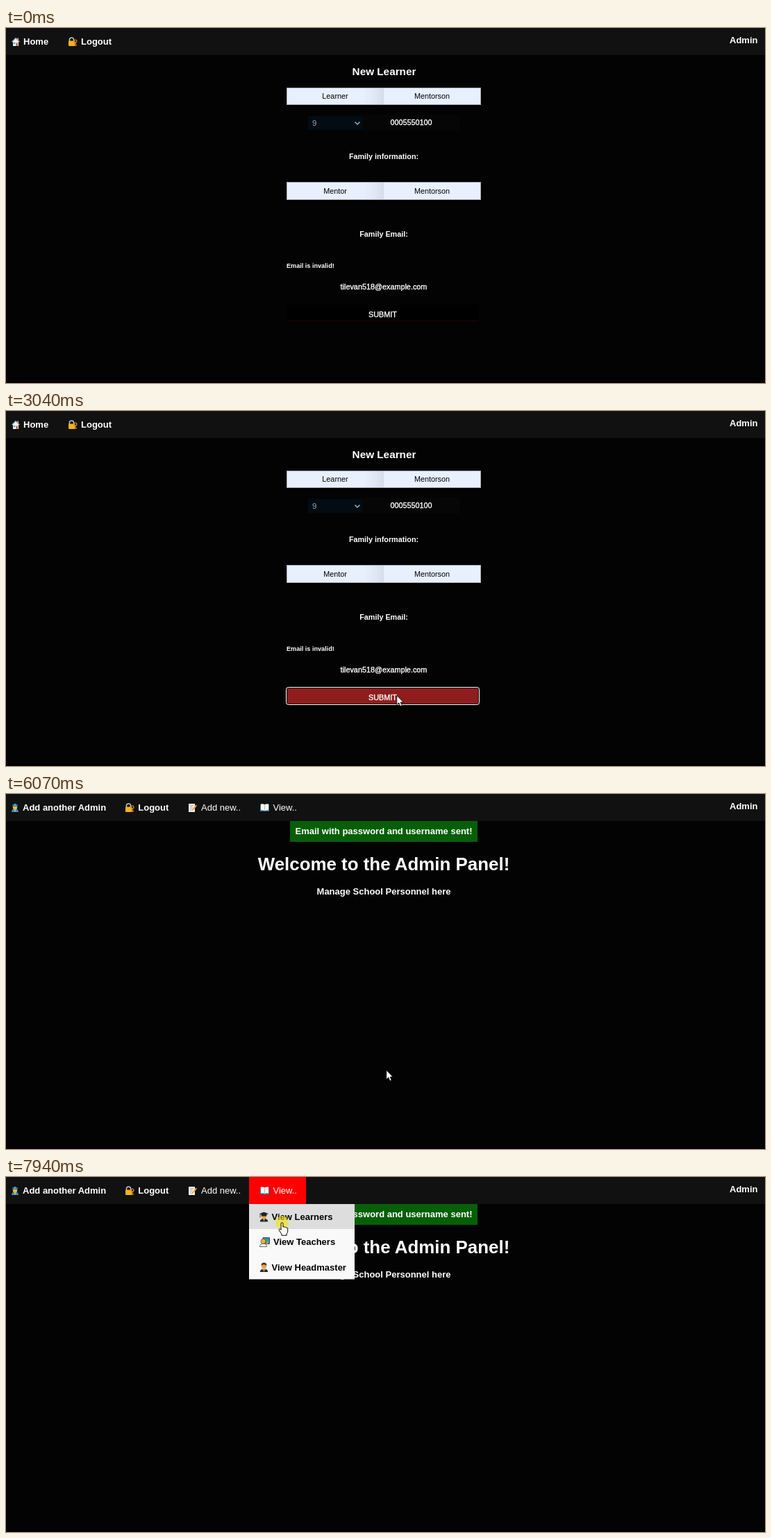
An HTML page that plays this animation: 1093x512 px, repeating every 8 s.

```html
<!DOCTYPE html>
<html lang="en">
<head>
<meta charset="utf-8">
<title>School admin panel</title>
<style>
  html, body { margin: 0; width: 100%; height: 100%; overflow: hidden; background: #030303; }
  svg { display: block; }
  #stage { width: 100vw; height: 100vh; }
  text { font: 13px "Liberation Sans", Arial, sans-serif; fill: #fff; white-space: pre; }
  .b { font-weight: bold; }
  .mid { text-anchor: middle; }
  .field { font-size: 10.83px; }
  .light { stroke: #fff; stroke-width: .35px; }
  .dark { fill: #000; }
  .h5 { font-size: 10.8px; font-weight: bold; }
  .input { stroke: #a4a8b2; }
</style>
</head>
<body>
<svg id="stage" viewBox="0 0 1093 512" preserveAspectRatio="none">
  <defs>
    <linearGradient id="shade">
      <stop offset=".39" stop-color="#e8f0fe"/>
      <stop offset=".45" stop-color="#e1e8f6"/>
      <stop offset=".5" stop-color="#d6dce9"/>
      <stop offset=".5" stop-color="#e8f0fe"/>
    </linearGradient>
    <g id="house">
      <path d="M2 6L6 2L10 6V13H2Z" fill="#eef2f3"/>
      <path d="M8.4 1.4H10V4.5H8.4Z" fill="#c9d0d2"/>
      <path d="M.6 7L6 1.6L11.4 7" fill="none" stroke="#a9b8bd" stroke-width="1.3"/>
      <path d="M6.6 8.5H8.8V13H6.6Z" fill="#a85840"/>
      <path d="M3 8H5.2V10.2H3Z" fill="#3b9bd0"/>
    </g>
    <g id="lock">
      <path d="M2.4 6V4A3.1 3.1 0 0 1 8.6 4V6" fill="none" stroke="#c4c8cb" stroke-width="1.5"/>
      <rect x="1" y="5.6" width="9.4" height="7.4" rx="1" fill="#f5b21d"/>
      <circle cx="11" cy="6" r="1.9" fill="none" stroke="#d98a12" stroke-width="1.3"/>
      <path d="M11 8V13M11 11.6H13" stroke="#d98a12" stroke-width="1.3"/>
    </g>
    <g id="officer">
      <path d="M1 13Q1 8.6 6 8.6T11 13Z" fill="#3c8fc6"/>
      <circle cx="6" cy="6.2" r="3.2" fill="#f0b73c"/>
      <path d="M1.6 3L6 .4L10.4 3L9 5H3Z" fill="#2f7fb5"/>
      <path d="M5.2 2.2H6.8V3.6H5.2ZM5.4 9H6.6V12.6H5.4Z" fill="#f3d469"/>
    </g>
    <g id="memo">
      <path d="M1 1H10V13H1Z" fill="#f1f1ee"/>
      <path d="M2.5 3.5H8M2.5 5.7H7M2.5 8H5.5M2.5 10.4H5" stroke="#999" stroke-width=".8"/>
      <path d="M6 10.6L11.8 3.8" stroke="#efaa2a" stroke-width="2"/>
      <path d="M11.2 4.5L12.4 3.1" stroke="#df6d63" stroke-width="2"/>
    </g>
    <g id="book">
      <path d="M0 2H13V12H0Z" fill="#35759a"/>
      <path d="M1 1.5Q4 .8 6.5 2.2Q9 .8 12 1.5V10.5Q9 10 6.5 11.3Q4 10 1 10.5Z" fill="#f5f5f1"/>
      <path d="M6.5 2.2V11.3" stroke="#aaa" stroke-width=".8"/>
    </g>
    <g id="graduate">
      <path d="M.8 14Q.8 9.4 6.5 9.4T12.2 14Z" fill="#2a2a2a"/>
      <circle cx="6.5" cy="6.8" r="3.4" fill="#e9a63a"/>
      <path d="M0 2.4L6.5 0L13 2.4L6.5 5Z" fill="#222"/>
      <path d="M3 3.5H10V5.6H3ZM1 2.8V8" fill="#222" stroke="#222" stroke-width=".8"/>
      <path d="M5.5 10H7.5L6.5 13Z" fill="#eee"/>
    </g>
    <g id="teacher">
      <path d="M5 1H14.4V10H5Z" fill="#2b9ba0" stroke="#444" stroke-width="1"/>
      <path d="M.4 14Q.4 9.6 5.5 9.6T10.6 14Z" fill="#f6f6f4" stroke="#444" stroke-width=".8"/>
      <circle cx="5.5" cy="6.2" r="3.5" fill="#f0b33f" stroke="#444" stroke-width=".7"/>
      <path d="M9.5 12L12.8 6" stroke="#e3953b" stroke-width="1.6"/>
    </g>
    <g id="suit">
      <path d="M.8 14Q.8 9.4 6.5 9.4T12.2 14Z" fill="#2b2b2b"/>
      <circle cx="6.5" cy="5.4" r="3.6" fill="#e8a83c"/>
      <path d="M2.7 5Q2.4 .6 6.5 .6T10.3 5Q8 2.8 5 3.4Z" fill="#4a3526"/>
      <path d="M4.6 9.5H8.4L6.5 14Z" fill="#f2f2f2"/>
      <path d="M6.5 10V13.5" stroke="#b33" stroke-width="1"/>
    </g>
  </defs>

  <rect width="1093" height="512" fill="#030303"/>
  <rect y="510" width="1093" height="2" fill="#000"/>
  <rect width="1093" height="39" fill="#111"/>
  <text class="b" x="1042" y="21.6">Admin</text>

  <g id="form">
    <use href="#house" x="8" y="13"/>
    <text class="b" x="25" y="24">Home</text>
    <use href="#lock" x="89" y="13"/>
    <text class="b" x="108" y="24">Logout</text>

    <text class="b mid" x="544.5" y="67.6" style="font-size:15.3px">New Learner</text>
    <rect class="input" x="404.5" y="86.5" width="279" height="24" fill="url(#shade)"/>
    <text class="field mid dark" x="474" y="102.4">Learner</text>
    <text class="field mid dark" x="613.5" y="102.4">Mentorson</text>
    <rect x="435" y="127" width="79" height="20" fill="#020c12"/>
    <text x="441" y="141.3" style="font-size:11.5px;fill:#8ea9b8">9</text>
    <path d="M502.5 135.5L506 139L509.5 135.5" fill="none" stroke="#9fb0b8" stroke-width="1.5"/>
    <rect x="514" y="125" width="140" height="23" fill="#060606"/>
    <text class="field light mid" x="583.5" y="140.4">0005550100</text>

    <text class="h5 mid" x="544" y="189.4">Family information:</text>
    <rect class="input" x="404.5" y="222.5" width="279" height="25" fill="url(#shade)"/>
    <text class="field mid dark" x="474" y="238.9">Mentor</text>
    <text class="field mid dark" x="613.5" y="238.9">Mentorson</text>

    <text class="h5 mid" x="544" y="300.9">Family Email:</text>
    <text class="b" x="404" y="345.8" style="font-size:9.1px">Email is invalid!</text>
    <text class="field light mid" x="544" y="377.4">tilevan518@example.com</text>

    <rect x="404" y="399" width="277" height="24" rx="2" fill="#000"/>
    <path d="M405 422.5H680" stroke="#260505"/>
    <rect id="hover" x="404" y="399" width="277" height="24" rx="2" fill="#8f1d1d"/>
    <g id="focus" fill="none">
      <rect x="404.5" y="399.5" width="276" height="23" rx="2" stroke="#101010"/>
      <rect x="403.5" y="398.5" width="278" height="25" rx="3" stroke="#fff"/>
    </g>
    <text class="field light mid" x="542.5" y="416.8">SUBMIT</text>
  </g>

  <g id="panel">
    <g id="flash">
      <rect id="flashBox" y="39" fill="#065f06"/>
      <text id="flashText" class="mid" x="544">Email with password and username sent!</text>
    </g>
    <g id="welcome">
      <text class="b mid" x="544" y="110" style="font-size:25.9px">Welcome to the Admin Panel!</text>
      <text class="b mid" x="544" y="145">Manage School Personnel here</text>
    </g>
    <rect id="tab" x="350" width="82" height="39" fill="#f00"/>
    <use href="#officer" x="7" y="13"/>
    <text class="b" x="24" y="24">Add another Admin</text>
    <use href="#lock" x="171" y="13"/>
    <text class="b" x="190.3" y="24">Logout</text>
    <use href="#memo" x="262" y="13"/>
    <text x="281" y="24">Add new..</text>
    <use href="#book" x="366" y="13"/>
    <text x="384.5" y="24">View..</text>
    <g id="menu">
      <rect x="350" y="39" width="152" height="108.5" fill="#f9f9f9"/>
      <rect id="item" x="350" y="39" width="152" height="36" fill="#ddd"/>
      <use href="#graduate" x="365" y="50.5"/>
      <text class="b dark" x="382.5" y="62">View Learners</text>
      <use href="#teacher" x="365" y="86.5"/>
      <text class="b dark" x="385" y="98.3">View Teachers</text>
      <use href="#suit" x="365" y="123"/>
      <text class="b dark" x="382.5" y="134.7">View Headmaster</text>
    </g>
  </g>

  <circle id="click" r="9.7" fill="#f7e600"/>
  <g id="pointer" stroke="#000" stroke-width=".8" fill="#fff" stroke-linejoin="round">
    <path id="arrow" d="M.3 .3V13.6L3.3 10.8L5.4 15.8L7.7 14.8L5.6 10H9.7Z"/>
    <path id="hand" stroke-width="1" d="M-1.4 10.5V1.3Q-1.4 0 0 0T1.4 1.3V6.4Q2.7 5.4 3.8 6.8Q5.1 6 6 7.4Q8 6.8 8.2 9V12.5Q8 15 6.6 16.2V18.5H-.6V16.6L-4.3 11Q-4.8 9.4-3.6 9.2Q-2.6 9-1.4 10.5Z"/>
  </g>
</svg>
<script>
  const LOOP = 8000;
  const $ = id => document.getElementById(id);
  const show = (id, on) => $(id).setAttribute('visibility', on ? 'inherit' : 'hidden');
  const out = u => u * (2 - u);
  const smooth = u => u * u * (3 - 2 * u);
  const linear = u => u;

  // Each move: first and last step times, step count, start and end point, easing.
  const moves = [
    { t0: 100, t1: 460, n: 6, from: [576, 540], to: [559, 415], ease: out },
    { t0: 560, t1: 560, n: 1, from: [559, 415], to: [556, 407], ease: linear },
    { t0: 710, t1: 710, n: 1, from: [556, 407], to: [556, 406], ease: linear },
    { t0: 2650, t1: 2650, n: 1, from: [556, 406], to: [557, 410], ease: linear },
    { t0: 2880, t1: 3040, n: 3, from: [557, 410], to: [562.5, 410], ease: linear },
    { t0: 6070, t1: 6070, n: 1, from: [562.5, 410], to: [547.5, 398], ease: linear },
    { t0: 6140, t1: 6850, n: 10, from: [547.5, 398], to: [392.5, 26.5], ease: smooth },
    { t0: 6940, t1: 7020, n: 2, from: [392.5, 26.5], to: [395, 21], ease: linear },
    { t0: 7170, t1: 7490, n: 5, from: [395, 21], to: [397, 64], ease: smooth },
    { t0: 7710, t1: 7710, n: 1, from: [397, 64], to: [397.5, 65.7], ease: linear }
  ];

  function pointerAt(t) {
    const m = moves.filter(m => m.t0 <= t).pop();
    if (!m) return [576, 540];
    const gap = (m.t1 - m.t0) / (m.n - 1) || 1;
    const step = Math.min(m.n, 1 + Math.floor((t - m.t0) / gap + 1e-6));
    const u = m.ease(step / m.n);
    return m.from.map((a, i) => a + (m.to[i] - a) * u);
  }

  function drawFlash(t) {
    const step = t < 5210 ? 0 : t < 5290 ? 0.5 : 1;
    const bold = step > 0;
    const pad = 2 + 5.5 * step;
    const width = (bold ? 255 : 236) + 2 * pad;
    const box = $('flashBox');
    box.setAttribute('x', 544 - width / 2);
    box.setAttribute('width', width);
    box.setAttribute('height', 15 + 2 * pad);
    $('flashText').setAttribute('y', 50.4 + pad);
    $('flashText').style.fontWeight = bold ? 'bold' : 'normal';
    $('flash').setAttribute('opacity', 0.3 + 0.7 * step);
    $('welcome').setAttribute('transform', `translate(0 ${11 * (step - 1)})`);
  }

  function draw(t) {
    const [x, y] = pointerAt(t);
    const onPanel = t >= 5140;
    const open = onPanel && x < 432 && y < 75;
    const onItem = open && y > 39;

    show('form', !onPanel);
    show('panel', onPanel);
    $('hover').setAttribute('opacity', t < 388 ? 0 : t < 460 ? 0.5 : 1);
    show('focus', !onPanel && t >= 1097);
    drawFlash(t);
    show('tab', open);
    show('menu', open);
    show('item', onItem);

    show('arrow', !onItem);
    show('hand', onItem);
    $('pointer').setAttribute('transform', `translate(${x} ${y})`);

    const clicking = (t >= 1020 && t < 1250) || t >= 7940;
    show('click', clicking);
    $('click').setAttribute('cx', x);
    $('click').setAttribute('cy', y);
    $('click').setAttribute('opacity', t > 1173 && t < 1250 ? 0.3 : 0.6);
  }

  const start = performance.now();
  function tick() {
    draw((performance.now() - start) % LOOP);
    requestAnimationFrame(tick);
  }
  tick();
</script>
</body>
</html>
```
